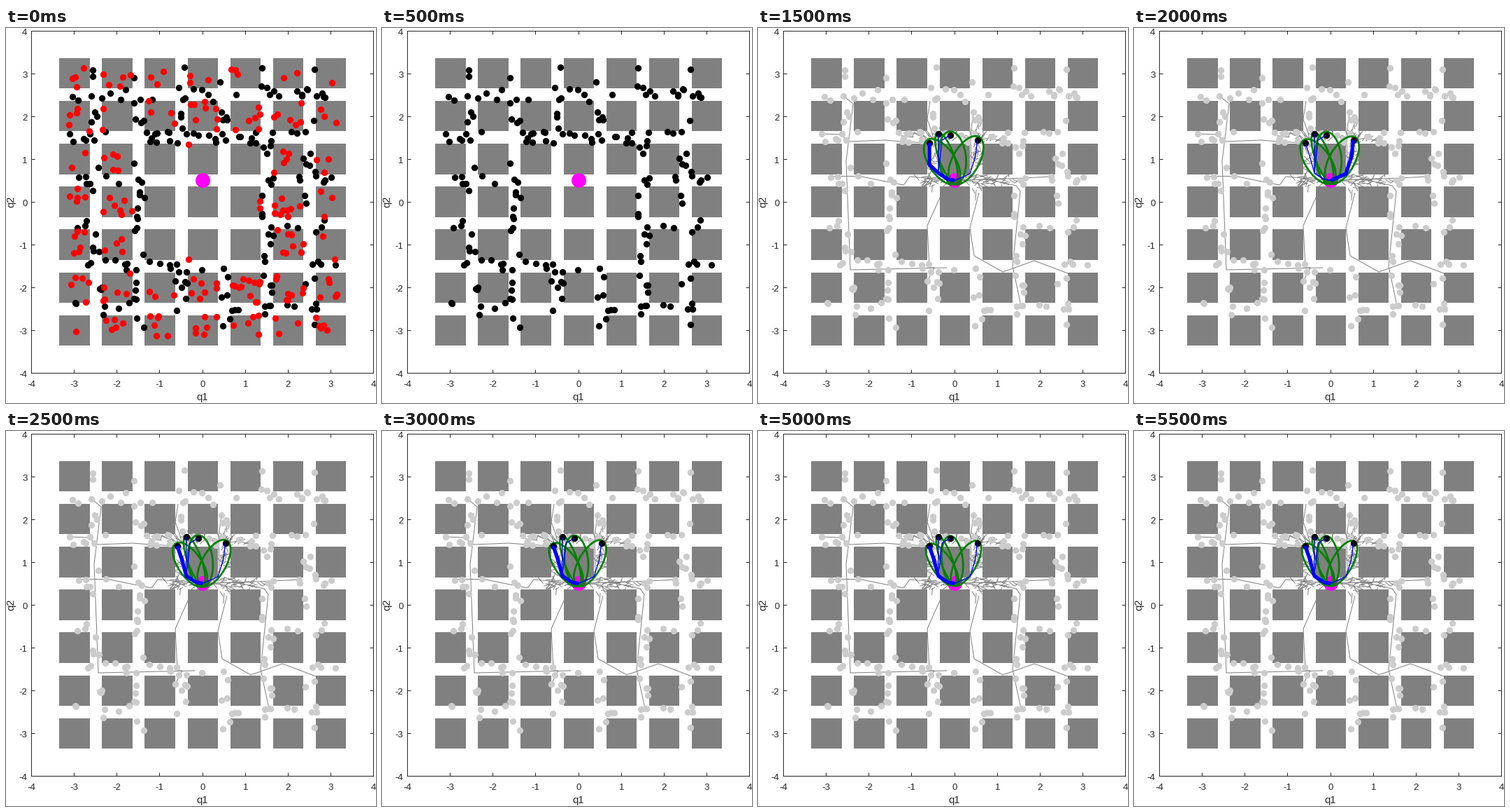
Write a matplotlib script that moves like this. It is 529 px wide and 535 px high and loops after 6000 ms.

```python
import numpy as np
import matplotlib.pyplot as plt
from matplotlib.animation import FuncAnimation
from matplotlib.collections import LineCollection, PatchCollection
from matplotlib.patches import Rectangle

W, H, DPI = 529, 535, 100
PX = 72 / DPI  # points per pixel
ORIGIN, UNIT = np.array([281.2, 248]), 61.1
LEFT, RIGHT, TOP, BOTTOM = 36.5, 525.5, 4.5, 492.5
GRAY, PALE, GREEN, INK = "#808080", "#cccccc", "#008000", "#262626"
HALF_BOX = 0.355
FRAMES, INTERVAL = 12, 500

plt.rcParams["font.family"] = "Liberation Sans"
fig = plt.figure(figsize=(W / DPI, H / DPI), dpi=DPI, facecolor="white")
ax = fig.add_axes([0, 0, 1, 1])
rng = np.random.default_rng(7)


def to_px(q):
    return ORIGIN + UNIT * np.asarray(q) * (1, -1)


START = to_px((0, 0.5))
NEAR_GOALS = [(245, 164), (257.5, 151), (274.5, 153), (313.5, 160)]
FAR_GOALS = [
    (122, 97), (127, 120), (209, 102), (206, 162), (143, 211), (296, 105),
    (308, 120), (315, 127), (365, 83), (357, 164), (368, 170), (379, 161),
    (382, 214), (419, 212), (242, 361), (369, 325), (376, 396),
]


def sample_ring(n):
    """Uniform samples around the start, split into free and colliding ones."""
    q = rng.uniform(-3.15, 3.15, (n, 2))
    q = q[np.abs(q).max(axis=1) > 1.33]
    hit = np.abs(q - np.round(q)).max(axis=1) < HALF_BOX
    return to_px(q[~hit]), to_px(q[hit])


def twigs(x0, x1, y0, y1, n):
    """Short branches pointing roughly away from the start."""
    base = rng.uniform((x0, y0), (x1, y1), (n, 2))
    out = base - START
    angle = np.arctan2(out[:, 1], out[:, 0]) + rng.normal(0, 0.7, n)
    length = rng.uniform(6, 16, n)
    tip = base + length[:, None] * np.stack([np.cos(angle), np.sin(angle)], 1)
    return list(np.stack([base, tip], 1))


free, BLOCKED = sample_ring(465)
FREE = np.vstack([free, FAR_GOALS, NEAR_GOALS])

# Main branches, from the tip towards the start
WEST = [(143, 211), (208, 224), (217, 212), START]
SOUTH = [(242, 361), (252, 342), (245, 342), (242, 282), (261, 240), START]
SOUTHWEST = [(122, 97), (136, 108), (126, 190), (132, 345), (270, 342)]
SOUTHEAST = [(376, 396), (364, 340), (375, 233), (369, 225), (330, 216), START]
EAST = [(419, 212), (382, 214), START]
NORTHWEST = [(130, 162), (182, 160), (206, 162), NEAR_GOALS[0]]
NORTHEAST = [(357, 164), (332, 157), NEAR_GOALS[3]]
NORTH = [(308, 120), (304, 150), (305, 200), START]
BRANCHES = [WEST, SOUTH, SOUTHWEST, SOUTHEAST, EAST, NORTHWEST, NORTHEAST, NORTH]

TREE = BRANCHES + [
    [(102, 211), (143, 211)], [(90, 151), (118, 152), (130, 162)],
    [(316, 235), (303, 285), (309, 325), (350, 348), (395, 332), (443, 350)],
    [(246, 104), (242, 130), (250, 153)],
]
TREE += twigs(241, 259, 155, 226, 45) + twigs(305, 319, 135, 232, 45)
TREE += twigs(228, 375, 212, 223, 60) + twigs(212, 345, 152, 163, 45)
EARLY_BRANCH = [(372, 165), (383, 135), (365, 83), (382, 105), (412, 93), (462, 102)]


def near_paths(frame):
    left_bend = (245, 195) if frame < 4 else (251, 182)
    corner = (258, 207)
    bends = [[left_bend, corner, (272, 216)], [corner, (270, 215)],
             [(263, 160), corner, (270, 215)], [(311, 183), (303, 208)]]
    return [[goal, *bend, START] for goal, bend in zip(NEAR_GOALS, bends)]


def ellipse(goal, slack):
    """Ellipse with the start and the goal as foci."""
    goal = np.array(goal)
    axis = (goal - START) / 2
    normal = np.array([-axis[1], axis[0]])
    t = np.linspace(0, 2 * np.pi, 121)[:, None]
    return ((START + goal) / 2 + np.hypot(1, slack) * np.cos(t) * axis
            + slack * np.sin(t) * normal)


def lines(paths, color, width, z, **style):
    ax.add_collection(LineCollection([np.array(p) for p in paths], colors=color,
                                     linewidths=width * PX, zorder=z, **style))


def dots(points, color, diameter, z):
    x, y = np.transpose(points)
    ax.scatter(x, y, s=(diameter * PX) ** 2, c=color, linewidths=0, zorder=z)


def draw_plot_area():
    side = 2 * HALF_BOX * UNIT
    corners = [to_px((i, j)) - side / 2 for i in range(-3, 4) for j in range(-3, 4)]
    ax.add_collection(PatchCollection([Rectangle(c, side, side) for c in corners],
                                      facecolor=GRAY, edgecolor="none", zorder=1))
    ax.add_patch(Rectangle((LEFT, TOP), RIGHT - LEFT, BOTTOM - TOP, fill=False,
                           ec=INK, lw=PX, zorder=9, snap=False))
    ticks = []
    label = dict(fontsize=13.3 * PX, color=INK, va="baseline")
    for k in range(9):
        x = np.floor(LEFT + k * (RIGHT - LEFT) / 8) + 0.5
        y = BOTTOM - k * (BOTTOM - TOP) / 8
        ticks += [[(x, BOTTOM), (x, BOTTOM - 5)], [(x, TOP), (x, TOP + 5)],
                  [(LEFT, y), (LEFT + 5, y)], [(RIGHT, y), (RIGHT - 5, y)]]
        ax.text(x, 512, str(k - 4), ha="center", **label)
        ax.text(30.5, y + 5.5, str(k - 4), ha="right", **label)
    lines(ticks, INK, 1, 9, snap=False, capstyle="butt")
    title = dict(fontsize=14.7 * PX, color=INK, ha="center")
    ax.text(281, 531, "q1", va="baseline", **title)
    ax.text(7, 248, "q2", va="center", rotation=90, **title)


def draw_search(frame):
    shrink = 1 - 0.23 * np.clip((frame - 3) / 5, 0, 1)
    slacks = np.array([0.58, 0.31, 0.6, 0.58]) * shrink
    lines(TREE, GRAY, 1, 2)
    lines([ellipse(g, s) for g, s in zip(NEAR_GOALS, slacks)], GREEN, 2.7, 5)
    dots(NEAR_GOALS, "black", 9.3, 6)
    paths = near_paths(frame)
    best = paths[3 if frame == 4 else 0]
    lines(paths, "blue", 1.4, 7)
    lines([best], "blue", 5.3, 7)
    if frame == 2:
        lines([EARLY_BRANCH], GRAY, 1, 2)
        lines([[START, g] for g in FAR_GOALS], GREEN, 2.7, 5)
        dots(FAR_GOALS, "black", 9.3, 6)
        lines(BRANCHES, "blue", 1.4, 7)


def update(frame):
    ax.clear()
    ax.set(xlim=(0, W), ylim=(H, 0))
    ax.axis("off")
    draw_plot_area()
    dots(FREE, "black" if frame < 2 else PALE, 9.3, 3)
    dots([START], "magenta", 21, 4)
    if frame == 0:
        dots(BLOCKED, "red", 9.3, 3.5)
    elif frame >= 2:
        draw_search(frame)
    return []


anim = FuncAnimation(fig, update, frames=FRAMES, interval=INTERVAL,
                     init_func=lambda: [], repeat=True, repeat_delay=0, blit=False)
plt.show()
```
